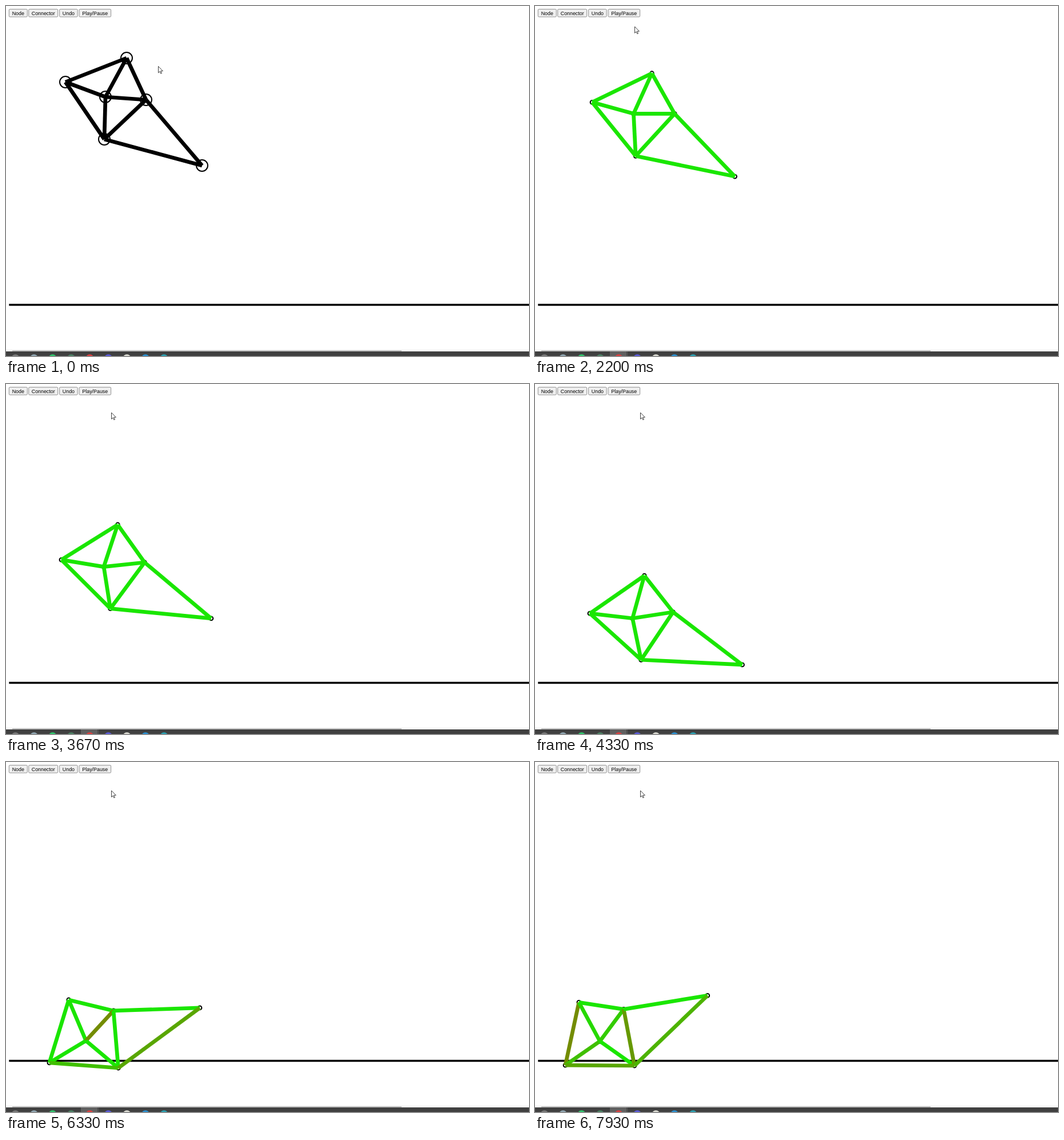
An HTML page for the animation above (8000 ms loop, 915x612 px).

```html
<!DOCTYPE html>
<html lang="en">
<head>
<meta charset="utf-8">
<title>Truss drop</title>
<style>
  html, body { margin: 0; width: 100%; height: 100%; overflow: hidden; background: #fff; }
  svg { display: block; }
  text { font: 8.89px "Liberation Sans", Arial, sans-serif; text-anchor: middle; }
</style>
</head>
<body>
<svg id="stage" width="915" height="612" viewBox="0 0 915 612">
  <g id="buttons"></g>
  <path d="M5.3 522.5H915" stroke="#000" stroke-width="3.3"/>
  <g id="nodes" fill="none" stroke="#000" stroke-width="2"></g>
  <g id="bars" stroke-width="6.7"></g>
  <rect y="601" width="915" height="3" fill="#f1f1f1"/>
  <rect x="11" y="602" width="681" height="2" fill="#c1c1c1"/>
  <rect y="604" width="915" height="8" fill="#404040"/>
  <g id="active" fill="#606060">
    <rect x="131" y="604" width="29" height="8"/>
    <rect x="160.7" y="604" width="1.6" height="8" fill="#555"/>
  </g>
  <g id="icons"></g>
  <path id="cursor" d="M0 0V11.3L2.6 8.9L4.3 12.7L6 12L4.3 8.2H7.9Z"
        fill="#fff" stroke="#111" stroke-width=".8"/>
</svg>
<script>
// times in seconds, angles in degrees
const LOOP = 8, STEP = 1 / 15, FOCUS = 1.13, PLAY = 1.2, IMPACT = 4.6;
const GRAVITY = 55.8, DRAG = .12, SPIN = -4.15, SPREAD = 1.01;

const NODES = { A: [104, 133], B: [211, 91], C: [174, 159], D: [245, 164], E: [172, 233], F: [343, 279] };
const EDGES = ['AB', 'AC', 'BC', 'BD', 'CD', 'CE', 'DE', 'AE', 'DF', 'EF'];
const [FOOT_X, FOOT_Y] = NODES.E;
const names = Object.keys(NODES);
const mean = axis => names.reduce((sum, n) => sum + NODES[n][axis], 0) / names.length;
const CENTER = [mean(0), mean(1)];

// after impact: time, foot x, foot y, turn, spread
const LANDING = [
  [IMPACT, 187, 523.3, -14.1, SPREAD],
  [4.73, 190, 537, -17.5, SPREAD],
  [5.2, 196, 535, -28.7, 1],
  [6.33, 196.5, 535, -51.4, 1],
  [7.2, 184, 534, -60, .985],
  [7.93, 174, 531, -57, .975]
];

// loaded bars at each moment, heaviest first
const LOADS = [
  [IMPACT, ''],
  [5.2, 'CE DF BD CD DE'],
  [6.33, 'CD -- EF -- AE'],
  [7.93, 'AB DE AE EF AC CD BC']
];

// pointer glides: start, end, x, y
const GLIDES = [[.07, .53, 160, 10], [1.5, 1.93, 174.5, 36], [2.2, 2.8, 184.5, 50]];

const $ = id => document.getElementById(id);
function set(el, attrs) {
  for (const k in attrs) el.setAttribute(k, attrs[k]);
}
function add(parent, tag, attrs) {
  const el = document.createElementNS('http://www.w3.org/2000/svg', tag);
  set(el, attrs);
  return parent.appendChild(el);
}
const rad = deg => deg * Math.PI / 180;
const mix = (a, b, u) => a + (b - a) * u;
const progress = (t, from, to) => Math.min(1, Math.max(0, (t - from) / (to - from)));
const ease = u => u * u * (3 - 2 * u);

function locate(keys, t) {
  let i = 0;
  while (i < keys.length - 2 && t >= keys[i + 1][0]) i++;
  return [i, progress(t, keys[i][0], keys[i + 1][0])];
}

// smooth curve through the keys, for column c
function spline(keys, t, c) {
  const [i, u] = locate(keys, t), v = 1 - u;
  const slope = n => (keys[n + 1][c] - keys[n][c]) / (keys[n + 1][0] - keys[n][0]);
  const tangent = n => {
    if (n === 0) return slope(0);
    if (n === keys.length - 1) return slope(n - 1);
    const share = (keys[n][0] - keys[n - 1][0]) / (keys[n + 1][0] - keys[n - 1][0]);
    return mix(slope(n - 1), slope(n), share);
  };
  const h = keys[i + 1][0] - keys[i][0];
  return keys[i][c] * v * v * (1 + 2 * u) + keys[i + 1][c] * u * u * (3 - 2 * u)
    + h * u * v * (tangent(i) * v - tangent(i + 1) * u);
}

// foot position, turn and spread of the truss
function pose(t) {
  if (t >= IMPACT) return [1, 2, 3, 4].map(c => spline(LANDING, t, c));
  const s = Math.max(0, t - PLAY), turn = SPIN * s;
  const drop = GRAVITY / DRAG * (s - (1 - Math.exp(-DRAG * s)) / DRAG);
  const dx = FOOT_X - CENTER[0], dy = FOOT_Y - CENTER[1];
  const cos = Math.cos(rad(turn)), sin = Math.sin(rad(turn));
  return [
    CENTER[0] + dx * cos - dy * sin,
    CENTER[1] + drop + dx * sin + dy * cos,
    turn,
    s > 0 ? SPREAD : 1
  ];
}

// nodes swing about the foot; spread opens or closes the fan around its axis
function place(name, [x, y, turn, spread]) {
  const dx = NODES[name][0] - FOOT_X, dy = NODES[name][1] - FOOT_Y;
  const axis = rad(-60);
  const angle = axis + (Math.atan2(dy, dx) - axis) * spread + rad(turn);
  const length = Math.hypot(dx, dy);
  return [x + length * Math.cos(angle), y + length * Math.sin(angle)];
}

function load(edge, t) {
  const at = i => {
    const rank = LOADS[i][1].split(' ').indexOf(edge);
    return rank < 0 ? .1 : .45 - .05 * rank;
  };
  const [i, u] = locate(LOADS, t);
  return mix(at(i), at(i + 1), u);
}

const buttons = [['Node', 5.3, 32], ['Connector', 39.7, 51], ['Undo', 93.6, 31.6], ['Play/Pause', 128, 55.6]]
  .map(([label, x, width]) => {
    const box = add($('buttons'), 'rect', {
      x, y: 5.6, width, height: 13.4, rx: 1.6, fill: '#efefef', stroke: '#767676', 'stroke-width': .8
    });
    add($('buttons'), 'text', { x: x + width / 2, y: 15.5 }).textContent = label;
    return box;
  });
const playButton = buttons[3];

const rings = names.map(() => add($('nodes'), 'circle', {}));
const bars = EDGES.map(() => add($('bars'), 'line', {}));

['#777', '#8fa5b0', '#2fc46b', '#4b7f63', '#d94040', '#5a5ad8', '#d8d8d0', '#2a8fd0', '#2a9fb0']
  .forEach((fill, i) => add($('icons'), 'circle', { cx: 16.5 + i * 32.5, cy: 616, r: 7, fill }));

function draw(t) {
  const playing = t >= PLAY;
  const now = pose(t), at = {};
  names.forEach((name, i) => {
    const [cx, cy] = at[name] = place(name, now);
    set(rings[i], { cx, cy, r: playing ? 3.4 : 10 });
  });

  EDGES.forEach((edge, i) => {
    const [x1, y1] = at[edge[0]], [x2, y2] = at[edge[1]], k = load(edge, t);
    const stroke = playing ? `rgb(${255 * k},${255 * (1 - k)},0)` : '#000';
    set(bars[i], { x1, y1, x2, y2, stroke });
  });

  let x = 266.5, y = 105.5;
  for (const [from, to, toX, toY] of GLIDES) {
    const u = ease(progress(t, from, to));
    x = mix(x, toX, u);
    y = mix(y, toY, u);
  }
  set($('cursor'), { transform: `translate(${x} ${y})` });

  const hover = y < 19 && x > 128 && x < 184;
  const pressed = t >= FOCUS && !playing;
  set(playButton, {
    fill: pressed ? '#f5f5f5' : hover ? '#e5e5e5' : '#efefef',
    stroke: hover && !pressed ? '#4f4f4f' : '#767676'
  });
  set($('active'), { visibility: t >= FOCUS ? 'visible' : 'hidden' });
}

const start = performance.now();
function tick() {
  const t = Math.max(0, performance.now() - start) / 1000 % LOOP;
  draw(Math.floor(t / STEP + .08) * STEP);
  requestAnimationFrame(tick);
}
tick();
</script>
</body>
</html>
```
